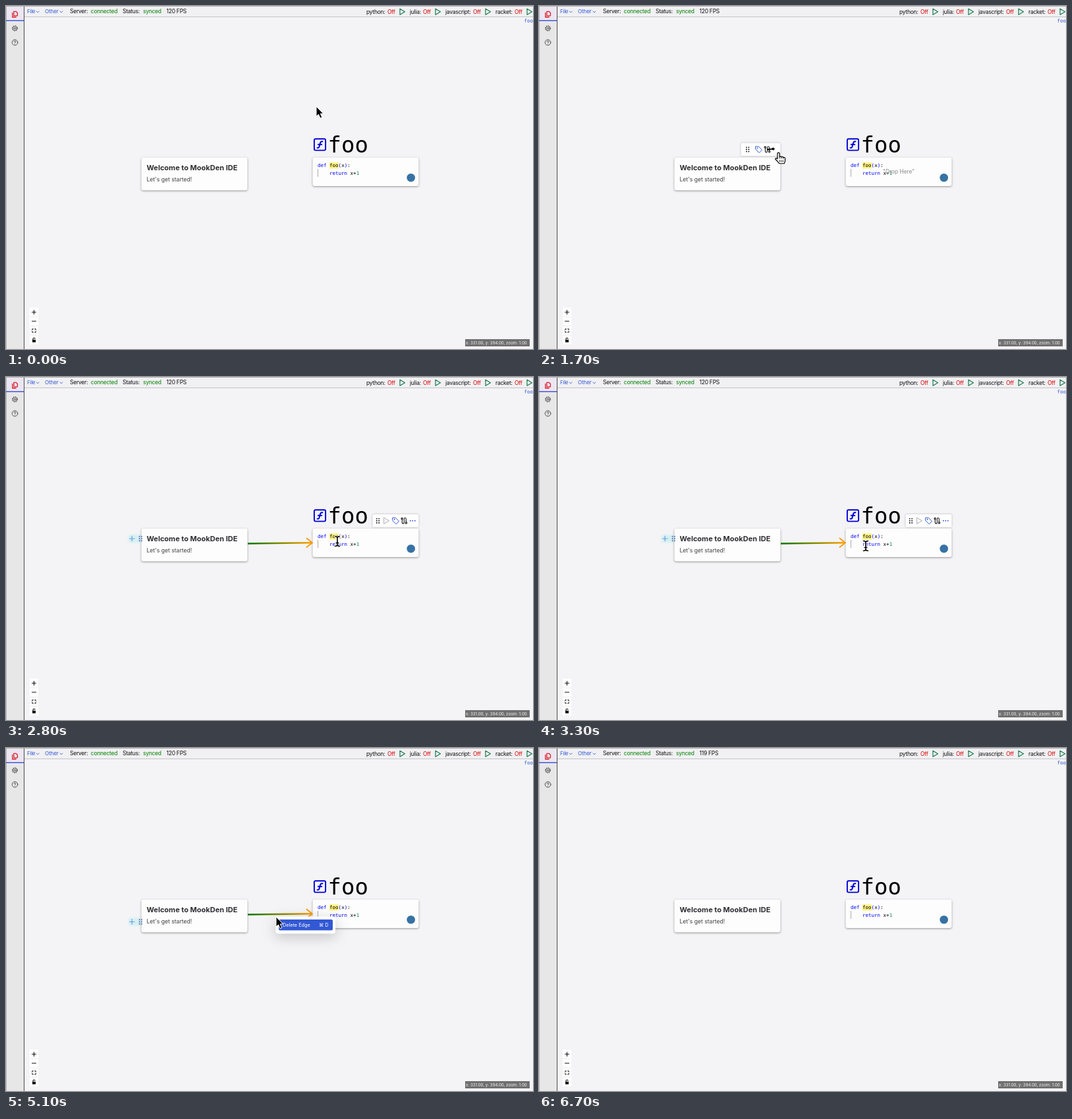
An HTML page for the animation above (7400 ms loop, 800 by 522 pixels).

```html
<!DOCTYPE html>
<html lang="en">
<head>
<meta charset="utf-8">
<title>Connecting two pods</title>
<style>
  html, body { margin: 0; width: 100%; height: 100%; overflow: hidden; background: #f4f4f6; }
  svg { display: block; width: 800px; height: 522px; }
  text { font-family: Inter, "DejaVu Sans", sans-serif; white-space: pre; }
  .bar { font-size: 8.5px; letter-spacing: -.03em; fill: #111; }
  .bar .on { fill: #008000; }
  .bar .off { fill: #d80000; }
  .mono { font-family: "DejaVu Sans Mono", monospace; }
  .kw { fill: #00f; }
  .line { fill: none; stroke-linecap: round; stroke-linejoin: round; }
  .card { fill: #fdfdfd; filter: drop-shadow(0 1.2px 1.8px #0006); }
  .tools { fill: #fff; filter: drop-shadow(0 .8px 1.5px #0004); }
</style>
</head>
<body>
<svg viewBox="0 0 800 522">
  <defs>
    <linearGradient id="edgeColor" gradientUnits="userSpaceOnUse" x1="367" x2="464" y1="0" y2="0">
      <stop stop-color="#087500"/><stop offset=".3" stop-color="#4a8200"/><stop offset="1" stop-color="#ffa000"/>
    </linearGradient>
    <filter id="soft" x="-20%" y="-50%" width="140%" height="200%"><feGaussianBlur stdDeviation="1.5"/></filter>
    <path id="grip" class="line" stroke-width="1.9" d="M-1.7-3.2h0M1.7-3.2h0M-1.7 0h0M1.7 0h0M-1.7 3.2h0M1.7 3.2h0"/>
    <path id="play" class="line" d="M0-4.5 7.5 0 0 4.5Z"/>
    <g id="tag" class="line" stroke="#3358d4">
      <path d="M-4.5-4.5H0L5 .8.8 5-4.5 0Z"/><circle cx="-2" cy="-2" r=".5"/>
    </g>
    <g id="connect" class="line" stroke="#111" stroke-width="1.1">
      <path d="M-3-2V2.5Q-3 4.5-1.5 4.5T0 2.5V-2.5Q0-4.5 1.5-4.5T3-2.5V2"/>
      <circle cx="-3.2" cy="-3.2" r="1.2"/><circle cx="3.2" cy="3.2" r="1.2"/>
    </g>
    <path id="dots" class="line" stroke="#3358d4" stroke-width="1.9" d="M-3.5 0h0M0 0h0M3.5 0h0"/>
    <path id="beamShape" class="line" d="M-3.5-7.5Q0-7.5 0-5Q0-7.5 3.5-7.5M0-5V5M-3.5 7.5Q0 7.5 0 5Q0 7.5 3.5 7.5M-1.8 2.5H1.8"/>
  </defs>

  <!-- frame and sidebar -->
  <rect width="800" height="522" fill="#f4f4f6"/>
  <path fill="#f1f1f3" d="M28 0H800V16H28Z"/>
  <path fill="#e7e7e7" d="M0 0H27V522H0Z"/>
  <path fill="#ebe6f2" d="M0 2H27V22H0Z"/>
  <path fill="none" stroke="#c4c4ca" d="M28 16.5H800"/>
  <path fill="none" stroke="#b4b4b4" d="M0 .5H800M.5 0V522"/>
  <path fill="none" stroke="#4a4a4a" d="M27.5 1V522"/>
  <path stroke="#3a4fd0" stroke-width="1.4" d="M0 22.3H27"/>
  <g class="line" stroke="#dc2028" stroke-width="1.3">
    <path d="M11.8 8.3h3.4l2.2 2.2v4.3h-5.600Z"/><path d="M9.700 10.500V17h5.500"/>
  </g>
  <g class="line" stroke="#444" stroke-width=".9">
    <circle cx="13.5" cy="34" r="3.3"/><circle cx="13.5" cy="34" r="1.3"/>
    <circle cx="13.5" cy="34" r="4.2" stroke-dasharray="1.3 2" stroke-linecap="butt"/>
    <circle cx="13.5" cy="55.5" r="4.3"/>
    <path d="M12.1 54.5q0-1.5 1.4-1.5t1.4 1.3-1.4 1.7M13.5 57.8h0"/>
  </g>

  <!-- top bar -->
  <g font-size="8" fill="#3358d4">
    <text x="32" y="11.3" letter-spacing="-.25">File</text>
    <text x="59" y="11.3" letter-spacing="-.1">Other</text>
    <path class="line" stroke="#3358d4" stroke-width=".9" d="m46.3 8 1.9 1.9L50.1 8M82 8l1.9 1.9L85.8 8"/>
  </g>
  <g class="bar">
    <text x="97" y="11">Server:</text><text class="on" x="128.8" y="11">connected</text>
    <text x="177" y="11">Status:</text><text class="on" x="208" y="11">synced</text>
    <text x="243.5" y="11" id="fps"></text>
    <g id="kernels"></g>
  </g>
  <text class="mono" x="786.5" y="24.5" font-size="7.5" fill="#3358d4">foo</text>

  <!-- zoom controls and position -->
  <rect x="36" y="459" width="13" height="56" fill="#fefefe"/>
  <path stroke="#e6e6e6" stroke-width=".7" d="M36 473H49M36 487H49M36 501H49"/>
  <g class="line" stroke="#111" stroke-width="1.1">
    <path d="M39.5 466h6M42.5 463v6M39.5 479.8h6"/>
    <path stroke-width="1" d="M39.8 493v-1.5h1.5M43.7 491.5h1.5V493M45.2 495v1.5h-1.5M41.3 496.5h-1.5V495"/>
    <path d="M41 508v-1.5q0-1.5 1.5-1.5t1.5 1.2"/><path fill="#111" d="M40.5 508.2h4v3h-4Z"/>
  </g>
  <rect x="697" y="507" width="98" height="11" fill="#707070"/>
  <text x="698" y="515" font-size="6.2" fill="#f4f4f4">x: 331.00, y: 394.00, zoom: 1.00</text>

  <!-- text pod -->
  <g id="side">
    <rect x="186" y="240" width="24" height="12" rx="2" fill="#d5f0f2" filter="url(#soft)"/>
    <path class="line" stroke="#6c9ce0" stroke-width="1.2" d="M187.5 246h7.5M191.2 242.2v7.5"/>
  </g>
  <rect class="card" x="205.5" y="230.5" width="161" height="50" rx="3"/>
  <use id="sideGrip" href="#grip" x="204.3" y="246" stroke="#4a63a8"/>
  <text x="213.5" y="250" font-size="11" font-weight="700" fill="#2f2f33">Welcome to MookDen IDE</text>
  <text x="213.5" y="267.3" font-size="8.6" fill="#3f3f3f">Let's get started!</text>

  <!-- code pod -->
  <rect class="card" x="465.5" y="230.5" width="161" height="43.5" rx="3"/>
  <g class="line" stroke="#0000d8" stroke-width="1.9">
    <rect x="467.9" y="202.2" width="17.2" height="17.4" rx="2"/>
    <path d="M472.5 215.8q2.5.6 3.2-2.3l1.3-5q.7-2.8 3.5-2.2M473.8 210.8h5.5"/>
  </g>
  <text class="mono" x="488.5" y="223" font-size="34">foo</text>
  <rect x="491" y="238" width="14" height="9.5" fill="#fff383"/>
  <path stroke="#aaa" d="M473.5 248V260"/>
  <g font-size="7.5">
    <text class="mono" x="473" y="245.3"><tspan class="kw">def</tspan> foo<tspan class="kw">(</tspan>x<tspan class="kw">)</tspan>:</text>
    <text class="mono" x="491" y="256.8"><tspan class="kw">return</tspan> x+<tspan fill="#098658">1</tspan></text>
  </g>
  <circle cx="614.7" cy="261.3" r="6.3" fill="#3672a4"/>
  <text id="drop" x="522" y="254.5" font-size="8.4" fill="#8a8a8a">"Drop Here"</text>

  <!-- hover toolbars -->
  <g id="textTools">
    <rect class="tools" x="306.5" y="208.5" width="60" height="19.5" rx="2.5"/>
    <use href="#grip" x="316.7" y="218.3" stroke="#111"/>
    <use href="#tag" x="333.5" y="218.3"/>
    <use href="#connect" x="346.5" y="218.3"/>
    <use id="more" href="#dots" x="359.5" y="218.3"/>
  </g>
  <g id="codeTools">
    <rect class="tools" x="556.5" y="209" width="70" height="19.5" rx="2.5"/>
    <use href="#grip" x="564.5" y="218.8" stroke="#111"/>
    <use href="#play" x="574" y="218.8" stroke="#aaa"/>
    <use href="#tag" x="591.5" y="218.8"/>
    <use href="#connect" x="604.3" y="218.8"/>
    <use href="#dots" x="617.3" y="218.8"/>
  </g>

  <!-- connection -->
  <g id="drag">
    <path id="dragLine" stroke="#000" stroke-width="1.9"/>
    <circle id="dragEnd" r="2"/>
  </g>
  <g id="edge" class="line">
    <path stroke="url(#edgeColor)" stroke-width="2.4" stroke-linecap="butt" d="M367 253.5 464 252.2"/>
    <path stroke="#f59c10" stroke-width="1.9" d="M456.5 245.5 465 252.2 456.5 259"/>
  </g>
  <g id="menu">
    <rect x="409.5" y="256.5" width="90.5" height="26" rx="4" fill="#fff" style="filter:drop-shadow(0 5px 10px #0003)"/>
    <rect x="414" y="261" width="82" height="16.5" rx="2" fill="#3358d4"/>
    <g font-size="7.3" fill="#fff"><text x="420" y="271.8">Delete Edge</text><text x="475" y="271.8">⌘ D</text></g>
  </g>

  <g id="cursor" stroke-linejoin="round">
    <path id="arrow" stroke="#fff" d="M0 0V15L3.5 11.9 6 17.7 8.8 16.5 6.3 10.9H10.8Z"/>
    <g id="hand" stroke="#000" stroke-width="1.2">
      <path fill="#fff" d="M-1.6 1.2Q0-1 1.6 1.2V6.5Q3.3 5.2 4.4 6.8 6.3 5.8 7.3 7.5 9.7 7 10 9V12Q10 14 8.7 16.8H1Q-1 13.5-4.7 10.3-4.8 8.3-2.8 8.6L-1.6 9.8Z"/>
      <path fill="none" stroke-width=".9" d="M1.6 6.5V9.5M4.4 7V9.5M7.3 7.5V9.8M2 11.5V14.5M4.4 11.5V14.5M6.8 11.5V14.5"/>
    </g>
    <g id="beam">
      <use href="#beamShape" stroke="#fff" stroke-width="3"/>
      <use href="#beamShape" stroke="#000" stroke-width="1.6"/>
    </g>
  </g>
</svg>
<script>
const LOOP = 7400, STEP = 100;
const el = id => document.getElementById(id);
const show = (id, visible) => { el(id).style.display = visible ? '' : 'none'; };

// name, label x, state x, run button x
el('kernels').innerHTML = [
  ['python', 547, 579, 598], ['julia', 613, 633, 652],
  ['javascript', 667, 709, 728], ['racket', 743, 772, 791]
].map(([name, x, stateX, playX]) =>
  `<text x="${x}" y="11.8">${name}:</text><text class="off" x="${stateX}" y="11.8">Off</text>
   <use href="#play" x="${playX}" y="8.7" stroke="#18794e" stroke-width="1.2"/>`).join('');

// pointer path: time, x, y
const path = [
  [0, 471, 153], [100, 471, 153], [600, 362, 233], [1000, 338, 221], [1400, 347, 221],
  [1600, 353, 223], [2300, 427, 222.5], [2800, 503, 250], [3300, 496, 257], [3400, 496, 258],
  [3900, 425, 264], [4300, 411.5, 261], [4600, 413, 264], [4900, 410, 257],
  [5200, 410, 257], [5800, 423, 264], [LOOP, 423, 264]
];

function pointerAt(t) {
  const i = path.findIndex(p => p[0] > t);
  const [t0, x0, y0] = path[i - 1], [t1, x1, y1] = path[i];
  const k = (t - t0) / (t1 - t0);
  return [x0 + (x1 - x0) * k, y0 + (y1 - y0) * k];
}

function shapeAt(t) {
  if (t >= 6500) return '';
  if (t >= 1400 && t < 2800 || t >= 4000 && t < 5000) return 'hand';
  return t >= 2800 && t < 3700 ? 'beam' : 'arrow';
}

function draw(now) {
  const t = Math.floor(now % LOOP / STEP) * STEP;
  const within = (from, to) => t >= from && t < to;
  const [x, y] = pointerAt(t);

  el('cursor').setAttribute('transform', `translate(${x} ${y})`);
  for (const shape of ['arrow', 'hand', 'beam']) show(shape, shapeAt(t) === shape);

  const slow = within(900, 1700) || t >= 5300;
  el('fps').textContent = `${slow ? 119 : 120} FPS`;

  show('textTools', within(600, 2800));
  show('more', t < 1600);
  show('codeTools', within(2800, 3700));

  const dragging = within(1600, 2800);
  const endX = x - 8, endY = y - 5.5;
  show('drag', dragging);
  show('drop', dragging);
  el('dragLine').setAttribute('d', `M346 218.5L${endX} ${endY}`);
  el('dragEnd').setAttribute('cx', endX);
  el('dragEnd').setAttribute('cy', endY);

  const connected = within(2800, 6200);
  show('edge', connected);
  show('menu', within(5000, 6200));
  for (const id of ['side', 'sideGrip']) {
    show(id, connected);
    el(id).setAttribute('transform', `translate(0 ${t < 4500 ? 0 : 18.5})`);
  }
  requestAnimationFrame(draw);
}
requestAnimationFrame(draw);
</script>
</body>
</html>
```
